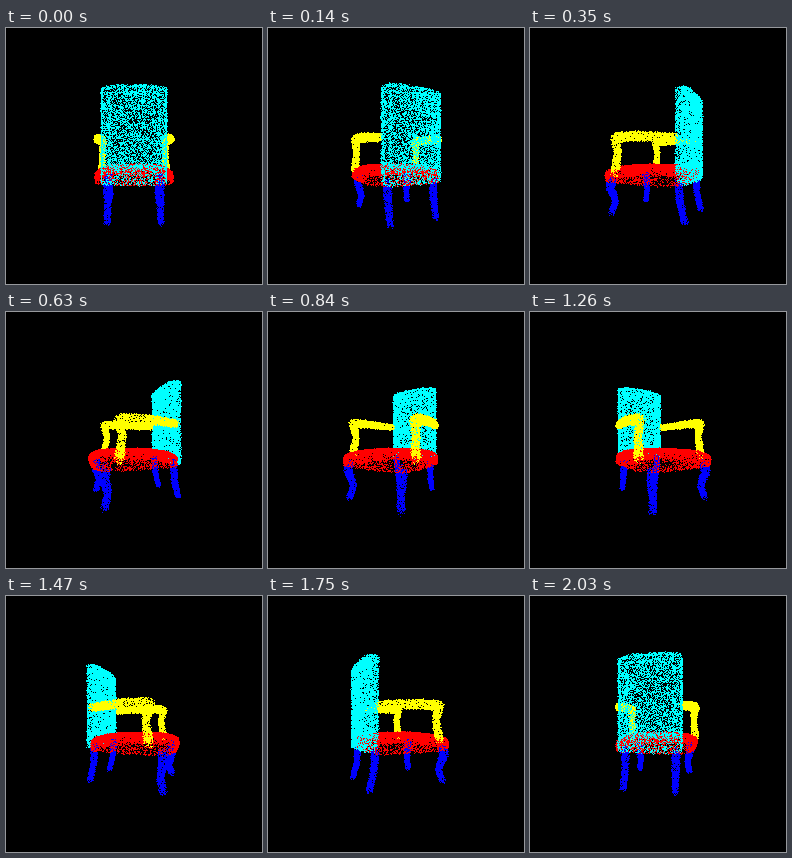
Recreate the animation shown at these times as a matplotlib script. Size 256 px wide and 256 px high, loop 2100 ms.

```python
import numpy as np
import matplotlib.pyplot as plt
from matplotlib.animation import FuncAnimation

SIZE, DPI = 256, 100
FRAMES, STEP_MS = 30, 70
CAMERA = 187          # distance to the turning axis, in px at the axis
CX, HORIZON = 128, 127

CYAN, YELLOW, RED, BLUE = (0, 1, 1), (1, 1, 0), (1, 0, 0), (0, 0, 1)
rng = np.random.default_rng(4)


def uni(a, b, n):
    return rng.uniform(a, b, n)


def tube(path, radius, n):
    """Points on the skin of a bent tube through (x, y, z) knots."""
    path = np.array(path, float)
    seg = np.linalg.norm(np.diff(path, axis=0), axis=1)
    s = np.r_[0, np.cumsum(seg)]
    t = uni(0, s[-1], n)
    mid = np.stack([np.interp(t, s, c) for c in path.T], 1)
    r = np.interp(t, s, radius)[:, None]
    skin = rng.normal(size=(n, 3))
    return mid + r * skin / np.linalg.norm(skin, axis=1, keepdims=True)


def crest(x):
    return 56 - 3 * (x / 27) ** 4


def backrest():
    parts = []
    for half, z, low in ((26, 38.5, -24.5), (27, 33, -13)):
        x = uni(-half, half, 2500)
        y = low + (crest(x) - low) * uni(0, 1, 2500)
        parts.append(np.stack([x, y, z - 1.5 * (x / 27) ** 2], 1))
    for side in (-1, 1):
        z = uni(31.5, 37.5, 420)
        parts.append(np.stack([side * (29.8 - z / 10), uni(-23, 53, 420), z], 1))
    x = uni(-26, 26, 250)
    parts.append(np.stack([x, crest(x), uni(32, 38, 250)], 1))
    panel = [(-20, -9, 34), (-20, 51, 34), (20, 51, 34), (20, -9, 34), (-20, -9, 34)]
    parts.append(tube(panel, [1] * 5, 450))
    return np.vstack(parts)


def rim(a, r):
    """Rounded, slightly tapered seat outline."""
    c, s = np.cos(a), np.sin(a)
    k = r / (abs(c) ** 5 + abs(s) ** 5) ** 0.2
    return 36 * k * c * (1 - 0.07 * k * s), -3.5 + 38 * k * s


def seat():
    n = 5000
    r = np.sqrt(uni(0, 1, n))
    x, z = rim(uni(0, 2 * np.pi, n), r)
    top = np.stack([x, -10.5 - 5 * r ** 5, z], 1)
    n = 2500
    x, z = rim(uni(0, 2 * np.pi, n), 1)
    v = uni(0, 1, n)
    bulge = 1 + 0.025 * np.sin(np.pi * v)
    side = np.stack([x * bulge, -15.5 - 9.5 * v, z * bulge], 1)
    return np.vstack([top, side])


def arm(side):
    rest = [(side * 28, 14, 31), (side * 33.5, 15, 14), (side * 36, 16, -4),
            (side * 35.5, 15.5, -24)]
    post = [(side * 35.5, 15, -24), (side * 35, 2, -21), (side * 36, -16, -24)]
    return np.vstack([tube(rest, [3.4, 3.7, 4, 4.5], 1500),
                      tube(post, [4, 3, 3.8], 750)])


def front_leg(side):
    knots = [(side * 30, -23, -34), (side * 30.5, -31, -34.5),
             (side * 27.5, -44, -31), (side * 29.5, -55, -34)]
    return tube(knots, [4.2, 4, 2.8, 3], 850)


def rear_leg(side):
    knots = [(side * 22, -22, 32), (side * 21.5, -38, 33), (side * 21.5, -54.5, 37)]
    return tube(knots, [3.2, 2.9, 2.3], 800)


chair = [(backrest(), CYAN), (seat(), RED)]
for s in (-1, 1):
    chair += [(arm(s), YELLOW), (front_leg(s), BLUE), (rear_leg(s), BLUE)]
points = np.vstack([p for p, _ in chair])
points += rng.normal(0, 0.3, points.shape)
colors = np.vstack([np.tile(c, (len(p), 1)) for p, c in chair])

fig = plt.figure(figsize=(SIZE / DPI, SIZE / DPI), dpi=DPI, facecolor="black")
ax = fig.add_axes([0, 0, 1, 1])
ax.set(xlim=(0, SIZE), ylim=(SIZE, 0))
ax.axis("off")
cloud = ax.scatter(points[:, 0], points[:, 1], s=(72 / DPI) ** 2, marker="s",
                   c=colors, linewidths=0, snap=False)


def draw(i):
    a = 2 * np.pi * i / FRAMES
    x, y, z = points.T
    turned = x * np.cos(a) + z * np.sin(a)
    depth = z * np.cos(a) - x * np.sin(a)
    k = 1 / (1 - depth / CAMERA)
    order = np.argsort(depth)
    xy = np.stack([CX + turned * k, HORIZON - y * k], 1)
    cloud.set_offsets(np.floor(xy[order]) + 0.5)  # one whole pixel per point
    cloud.set_facecolor(colors[order])
    return (cloud,)


anim = FuncAnimation(fig, draw, frames=FRAMES, interval=STEP_MS,
                     repeat=True, repeat_delay=0)
plt.show()
```
